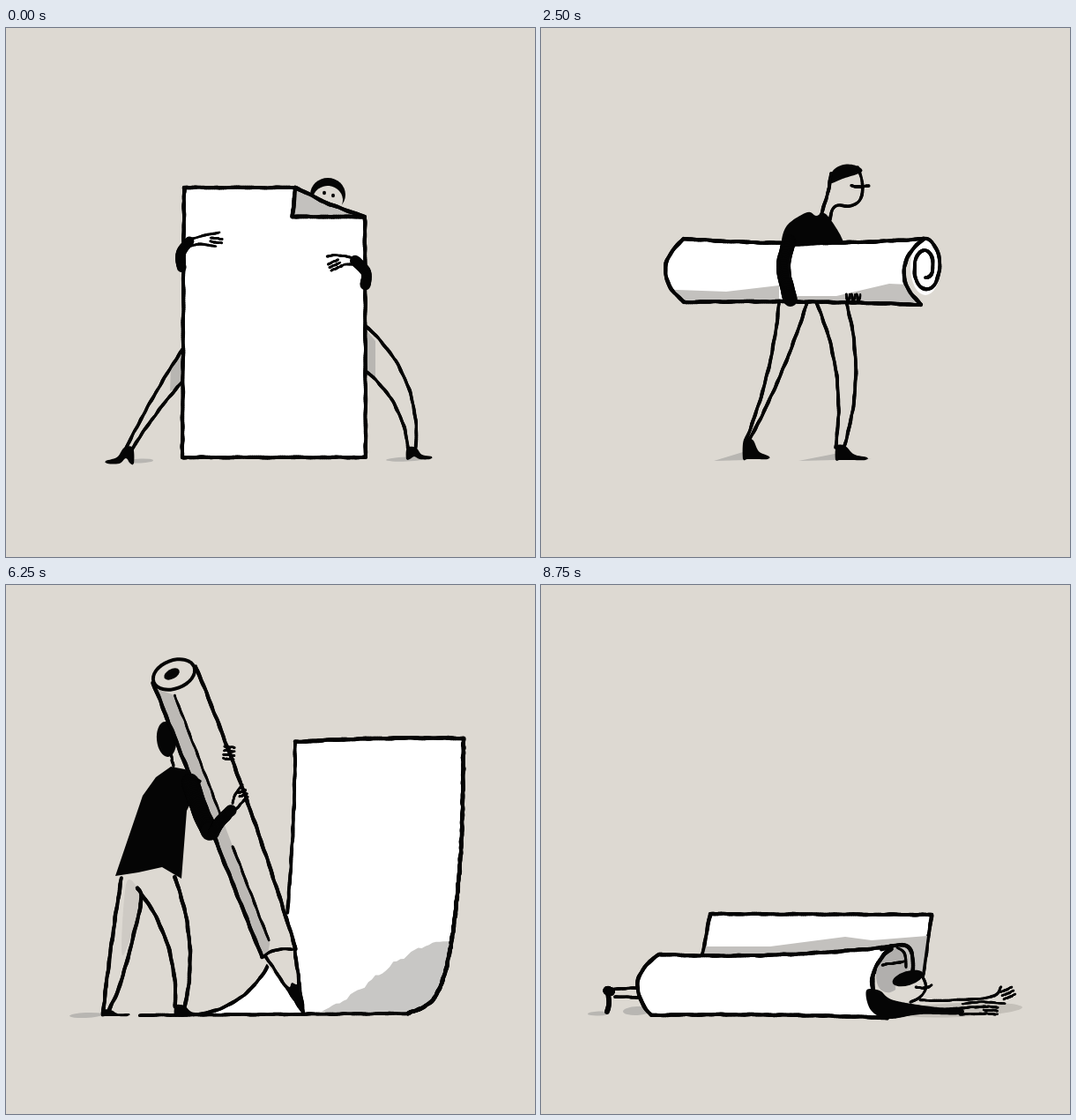
An HTML page with a canvas that plays this animation: 600 px wide and 600 px high, repeating every 10000 ms.

```html
<!DOCTYPE html>
<html lang="en">
<head>
<meta charset="utf-8">
<title>Paper worker</title>
<style>
html, body { margin: 0; width: 100%; height: 100%; overflow: hidden; background: #ddd9d2; }
canvas { display: block; width: 600px; height: 600px; }
</style>
</head>
<body>
<canvas id="stage" width="600" height="600"></canvas>
<script>
const ctx = document.getElementById('stage').getContext('2d');
const BG = '#ddd9d2', INK = '#050505', WHITE = '#fff', GREY = '#c3c1be', DARK = '#b8b6b2';
const HOLD = 1250;

// Points come as text "x y, x y" or as a list of pairs
const toPoints = p => typeof p === 'string' ? p.split(',').map(q => q.trim().split(' ').map(Number)) : p;

function catmull(a, b, c, d, t) {
  const slope = c - a, bend = 2 * a - 5 * b + 4 * c - d, twist = 3 * (b - c) + d - a;
  return b + 0.5 * t * (slope + t * (bend + t * twist));
}

// Smooth curve through the points, sampled about every 2 px
function smooth(path, closed = false) {
  const p = toPoints(path), n = p.length, out = [];
  const at = i => closed ? p[(i + n) % n] : p[Math.max(0, Math.min(n - 1, i))];
  for (let i = 0; i < (closed ? n : n - 1); i++) {
    const [a, b, c, d] = [at(i - 1), at(i), at(i + 1), at(i + 2)];
    const steps = Math.max(2, Math.ceil(Math.hypot(c[0] - b[0], c[1] - b[1]) / 2));
    for (let k = 0; k < steps; k++) {
      out.push([0, 1].map(j => catmull(a[j], b[j], c[j], d[j], k / steps)));
    }
  }
  out.push(closed ? p[0] : p[n - 1]);
  return out;
}

// Arc between two points, pushed sideways by b
function bow(x0, y0, x1, y1, b = 0) {
  const dx = x1 - x0, dy = y1 - y0, len = Math.hypot(dx, dy);
  return Array.from({ length: 13 }, (_, i) => {
    const t = i / 12, off = b * 4 * t * (1 - t) / len;
    return [x0 + dx * t - dy * off, y0 + dy * t + dx * off];
  });
}

function trace(path) {
  ctx.beginPath();
  toPoints(path).forEach(([x, y]) => ctx.lineTo(x, y));
  ctx.closePath();
}

function fill(path, color) {
  trace(path);
  ctx.fillStyle = color;
  ctx.fill();
}

const blob = (path, color = INK) => fill(smooth(path, true), color);

function oval(x, y, rx, ry, angle = 0, color = INK) {
  ctx.beginPath();
  ctx.ellipse(x, y, rx, ry, angle, 0, Math.PI * 2);
  ctx.fillStyle = color;
  ctx.fill();
}

// Brush line whose weight and place waver a little
function ink(path, width = 4) {
  const p = smooth(path), seed = p[0][0] + p[0][1];
  const wave = i => Math.sin(i * 0.41 + seed) * 0.6 + Math.sin(i * 0.93 + seed * 2) * 0.4;
  ctx.lineCap = 'round';
  ctx.strokeStyle = INK;
  for (let i = 1; i < p.length; i++) {
    ctx.lineWidth = width + 0.45 * wave(i);
    ctx.beginPath();
    for (const k of [i - 1, i]) ctx.lineTo(p[k][0] + 0.4 * wave(k * 0.7), p[k][1] + 0.4 * wave(k * 0.7 + 5));
    ctx.stroke();
  }
}

// Filled polygon with inked straight edges
function sheet(path, color, width = 4.2) {
  const p = toPoints(path);
  fill(p, color);
  p.forEach((a, i) => ink([a, p[(i + 1) % p.length]], width));
}

function shadow(x0, x1, y, h = 4, color = DARK) {
  oval((x0 + x1) / 2, y, (x1 - x0) / 2, h, -0.04, color);
}

// Ankle at x, y; the toe lies len to the side dir
function shoe(x, y, len, h, dir = 1, arch = 0) {
  const at = (dx, dy) => [x + dx * dir, y + dy];
  blob([at(-5, 0), at(5, 0), at(len * 0.5, h * 0.6), at(len, h - 3), at(len - 2, h),
    at(len * 0.4, h), at(3, h - arch), at(-2, h), at(-6, h)]);
}

// Parallel fingers starting around x, y
function hand(x, y, angle, len, count = 3, gap = 4.5) {
  const c = Math.cos(angle), s = Math.sin(angle);
  for (let i = 0; i < count; i++) {
    const off = (i - (count - 1) / 2) * gap, fx = x - s * off, fy = y + c * off;
    ink(bow(fx, fy, fx + c * len, fy + s * len), 2.6);
  }
}

// Paper tube from its four corners; both ends bulge to the left
function roll([x0, y0], [x1, y1], [x2, y2], [x3, y3], bulge) {
  const sides = [bow(x3, y3, x0, y0, -bulge), bow(x0, y0, x1, y1, 5),
    bow(x1, y1, x2, y2, bulge), bow(x2, y2, x3, y3, 2)];
  fill(sides.flat(), WHITE);
  return sides;
}

function holdSheet() {
  shadow(138, 167, 491, 2.5);
  shadow(431, 478, 489, 2.5);
  fill('187 383, 200 364, 200 405, 186 412', DARK);
  fill('408 342, 419 355, 419 397, 408 390', DARK);
  ink(bow(201, 363, 136, 477, 2), 3.6);
  ink(bow(200, 401, 142, 479, 2), 3.6);
  ink(bow(409, 339, 465, 476, -18), 3.6);
  ink(bow(409, 390, 456, 476, -10), 3.6);
  shoe(139, 476, 26, 18, -1, 6);
  shoe(460, 476, 23, 13, 1, 3);

  oval(365, 189, 20, 19);
  oval(365, 195, 17, 16, 0.1, BG);
  oval(361, 187, 2, 2.2);
  oval(371, 190, 2, 2.2);

  sheet('202 181, 328 181, 325 214, 407 214, 408 487, 200 487', WHITE);
  sheet('328 181, 367 200, 407 214, 325 214', GREY, 4.4);

  ink('208 242, 198 256, 199 272', 11);
  ink('209 240, 225 235, 242 232', 2.8);
  ink('210 247, 221 245, 238 248', 2.8);
  hand(232, 240, 0.13, 13, 2);
  ink('396 264, 408 277, 408 291', 12);
  ink(bow(364, 259, 394, 261, -2), 2.8);
  ink('380 271, 384 268, 393 268', 2.8);
  hand(379, 266, 2.7, 13, 3, 4);
}

function drawPencil() {
  const length = 410, collar = 335;
  ctx.save();
  ctx.translate(190, 102);
  ctx.rotate(Math.atan2(383, 147));
  const left = bow(0, 25, collar, 21, 0), right = bow(0, -27, collar + 5, -18, -4);
  fill([...left, [length, 0], ...right.slice().reverse()], BG);
  fill([[8, 24], [22, 7], [collar - 12, 7], [collar, 14], [collar, 20]], '#bcb9b5');
  ink(left, 4.4);
  ink(right, 4.2);
  ink(bow(22, 7, 172, 7), 2.8);
  ink(bow(206, 7, collar - 15, 7), 3);
  ink(bow(collar, 20, collar + 4, -14, -4), 3.4);
  ink(bow(collar, 17, length, 0), 3.4);
  ink(bow(collar, -18, length, 0), 4);
  blob([[length - 38, 8], [length - 32, 4], [length - 36, 0], [length - 32, -5], [length - 37, -9], [length, 0]]);
  ctx.restore();
  oval(190.5, 101.5, 26.5, 18, -0.36);
  oval(190.5, 101.5, 22.5, 14, -0.36, BG);
  oval(188, 101, 9.5, 5.5, -0.5);
}

function pushPencil() {
  shadow(72, 109, 488, 3);
  const side = smooth('519 174, 516 300, 504 412, 486 468, 456 486');
  const curl = bow(298, 430, 219, 487, -12);
  const paper = [[328, 178], ...side, ...curl.slice().reverse(), [319, 372]];
  fill(paper, WHITE);

  // Ragged grey slope, kept inside the sheet
  ctx.save();
  trace(paper);
  ctx.clip();
  const slope = Array.from({ length: 41 }, (_, i) => {
    const t = i / 40, rise = t * t * (3 - 2 * t);
    return [342 + 162 * t, 486 - 82 * rise - (3 + 2 * Math.sin(i * 1.1) + Math.sin(i * 2.7)) * Math.sin(Math.PI * t)];
  });
  fill([...slope, [520, 490], [342, 490]], '#c8c7c5');
  ctx.restore();

  ink(bow(328, 178, 519, 174, -2), 4.6);
  ink(side, 4.6);
  ink(bow(328, 178, 319, 372, -2), 3.8);
  ink(curl, 3.8);
  ink(bow(152, 488, 456, 486), 3.8);

  blob('136 340, 148 342, 152 362, 132 420', '#cecac4');
  ink(bow(131, 332, 110, 485, 1), 4.2);
  ink('149 344, 153 361, 132 445, 117 482', 4.2);
  ink(bow(149, 344, 192, 478, -13), 4.2);
  ink(bow(191, 331, 203, 478, -11), 4.2);
  shoe(114, 482, 26, 7);
  shoe(197, 477, 27, 12);

  oval(182, 175, 11, 20, -0.1);
  drawPencil();
  ink(bow(187, 191, 190, 206), 3);

  fill('187 206, 203 209, 222 222, 205 256, 199 333, 177 320, 150 326, 124 330, 155 239, 170 218', INK);
  ink('209 223, 217 248, 231 280', 20);
  ink(bow(235, 282, 255, 256, -2), 13);
  ink(bow(257, 248, 268, 227, -2), 2.8);
  ink(bow(261, 254, 274, 240), 2.8);
  hand(264, 238, -0.35, 9, 2);
  hand(247, 190, 0.1, 12, 4);
}

function carryRoll() {
  fill('196 491, 229 481, 234 490', DARK);
  fill('292 491, 333 483, 375 489', DARK);
  ink(bow(270, 312, 232, 468, -6), 3.8);
  ink(bow(302, 311, 236, 468, -4), 3.8);
  ink(bow(312, 311, 334, 476, -12), 3.8);
  ink(bow(346, 310, 344, 474, -12), 3.8);
  shoe(235, 467, 24, 22);
  shoe(340, 474, 30, 16);

  blob('327 176, 331 162, 343 155, 357 156, 364 163, 342 171');
  ink(bow(329, 165, 315, 218, -2), 3.8);
  ink('359 158, 365 178, 361 196, 350 202, 336 201, 330 207, 327 220', 3.4);
  ink(bow(352, 179, 372, 179, 1), 3.4);

  const sides = roll([162, 239], [434, 239], [431, 314], [162, 311], 21);
  oval(436, 271, 17, 32, 0, WHITE);
  ctx.save();
  trace(sides.flat());
  ctx.clip();
  fill('130 296, 210 299, 270 292, 270 330, 130 330', GREY);
  fill('285 304, 335 304, 395 290, 440 292, 440 330, 285 330', GREY);
  ctx.restore();
  sides.forEach(s => ink(s, 4.3));

  const turns = 1.5, spiral = Array.from({ length: 49 }, (_, i) => {
    const t = i / 48, a = Math.PI * 2 * turns * t - Math.PI / 2, r = 1 - 0.62 * t;
    return [436 + 18 * r * Math.cos(a), 271 + 32 * r * Math.sin(a)];
  });
  ink(spiral, 4);

  blob('273 246, 279 224, 302 209, 312 213, 323 211, 341 238, 336 244, 285 248');
  ink('281 242, 275 274, 283 308', 16);
  for (let x = 346; x < 360; x += 6) ink(bow(x, 302, x + 4, 302, 8), 2.6);
}

function trapped() {
  shadow(53, 78, 486, 2.5);
  shadow(93, 125, 483, 5);
  shadow(400, 546, 482, 8, '#c4c0b9');
  ink(bow(115, 457, 82, 458), 3.4);
  ink(bow(115, 468, 84, 467), 3.4);
  ink('75 484, 77 472, 75 461', 5.5);
  ink(bow(75, 460, 79, 461), 10);

  sheet('192 373, 443 374, 433 444, 183 420', WHITE);
  fill('187 410, 260 410, 345 399, 375 403, 438 398, 432 442, 185 418', GREY);

  const sides = roll([134, 419], [398, 410], [393, 491], [125, 488], 20);
  oval(398, 436, 17, 27, 0.3, '#b1afad');
  sides.forEach(s => ink(s, 4.3));
  ink(bow(398, 413, 378, 461, 9), 3);
  ink('386 413, 410 408, 420 416, 422 438', 4.4);
  ink('404 411, 412 417, 414 434', 3);
  ink(bow(387, 431, 412, 427), 3);

  oval(419, 457, 17, 17, 0, BG);
  oval(416, 446, 18, 8, -0.3);
  ink(bow(431, 440, 419, 473, -11), 3);
  ink(bow(425, 456, 443, 454, 2), 3);

  blob('369 460, 384 460, 400 471, 450 479, 475 479, 476 487, 430 487, 394 492, 374 482');
  ink('430 471, 465 471, 511 467, 522 456', 3);
  ink(bow(478, 475, 526, 475, -2), 2.6);
  hand(523, 466, -0.42, 14, 3);
  ink(bow(475, 480, 505, 478), 2.8);
  ink(bow(475, 487, 505, 486), 2.8);
  hand(502, 482, 0.06, 16, 3, 4);
}

const scenes = [holdSheet, pushPencil, carryRoll, trapped];
const start = performance.now();

function frame(now) {
  const index = Math.floor(Math.max(0, now - start) / HOLD) % scenes.length;
  ctx.fillStyle = BG;
  ctx.fillRect(0, 0, 600, 600);
  scenes[index]();
  requestAnimationFrame(frame);
}
frame(start);
</script>
</body>
</html>
```
